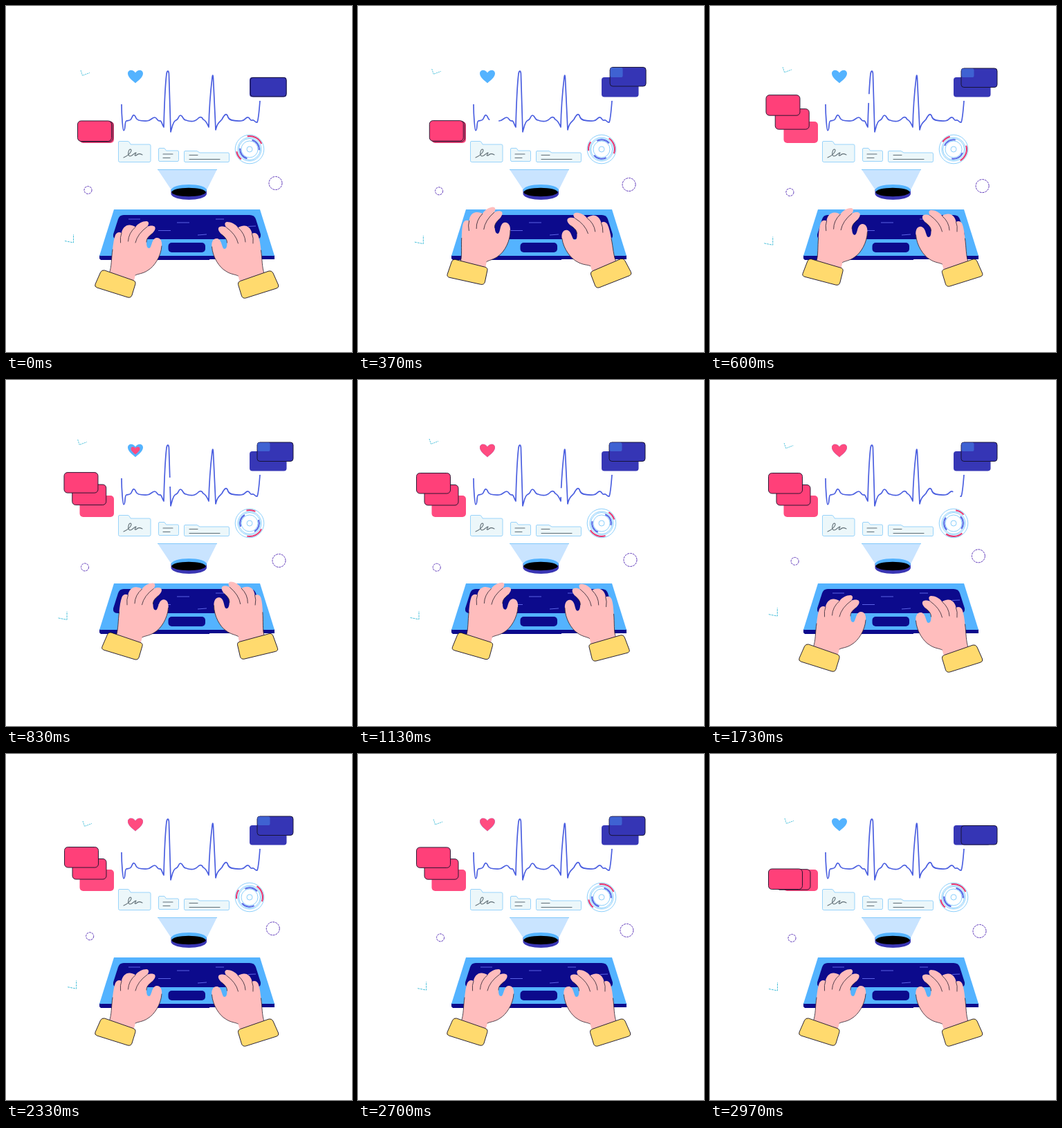
Write an HTML page that moves like this. It is 500 px wide and 500 px high and loops after 3.01 s.

```html
<!DOCTYPE html>
<html lang="en">
<head>
<meta charset="utf-8">
<title>Health desk</title>
<style>
  html, body { margin: 0; width: 100%; height: 100%; overflow: hidden; background: #fff; }
  svg { display: block; width: 100vw; height: 100vh; }
  .line { fill: none; stroke: #2b2230; stroke-width: .8; stroke-linecap: round; }
  .thin { fill: none; stroke: #6fc3fa; stroke-width: .8; }
  .mark { fill: none; stroke: #35b9d6; stroke-width: .9; }
  .folder { fill: #ecf7fa; stroke: #8fd0fa; stroke-width: .9; stroke-linejoin: round; }
  .ink { fill: none; stroke: #5f6d74; stroke-width: 1.1; stroke-linecap: round; }
  .dot { fill: none; stroke: #4a1fb0; stroke-width: .9; stroke-dasharray: 3 1; }
  .edge { stroke: #15102a; stroke-width: .9; }
</style>
</head>
<body>
<svg viewBox="0 0 500 500">
  <defs>
    <path id="heart" d="M0 9.5C-4 6-11 1-11-4.5C-11-10.5-3-11 0-5.5C3-11 11-10.5 11-4.5C11 1 4 6 0 9.5Z"/>
    <g id="hand">
      <path fill="#ffbdbd" d="M149 389C153 376 152 365 154 352C155 343 156 336 158 331C160 326.500 164 326 167 328C168 321 173 316 179 316.500C183 317 186 318 187 319.500C191 314 197 311 203 311C207 311.500 207 315 204 319C208 317 213 317 215 319C217 322 214 326 211 329C206 333 203 336 203 341C203 347 204 350 207 350C211 349 210 337 217 335C223 334 226 340 225 347C224 362 214 377 205 382C198 387 190 387 187 389L184 400Z"/>
      <path class="line" d="M167 328Q164.500 334 165.500 342M187 319.500Q177 328 176.500 340M204 319Q190 329 187 342M211 329C206 333 203 336 203 341M225 347C224 362 214 377 205 382C198 387 190 387 187 389M154 352C152 365 153 376 149 387"/>
      <path fill="#ffda6e" class="edge" stroke-width=".7" stroke-linejoin="round" d="M142.500 382L184 396.500Q188 398 187 401.500L182 418Q180.500 422 176 421L131.500 407Q127.500 405.500 129 402L136.500 385Q138.500 381 142.500 382Z"/>
    </g>
  </defs>

  <path id="tick" class="mark" stroke-dasharray="2 1" d="M108 93L110.500 100.500L121 96.500"/>
  <path id="corner" class="mark" stroke-dasharray="3 1" d="M85 339.500L97.500 342V330"/>
  <circle id="ringA" class="dot" cx="118.500" cy="266" r="5.500"/>
  <circle id="ringB" class="dot" cx="389.500" cy="256" r="9.500"/>

  <use href="#heart" x="187" y="102" fill="#54b3ff"/>
  <use id="pink" href="#heart" fill="#ff4b80"/>

  <path id="pulse" fill="none" stroke="#4b5fe0" stroke-width="1.700" stroke-linejoin="round" pathLength="100"
    d="M167 142C167 160 169 180 170 180C173 180 171 167 174 166C178 165 180 166 182 161C184 156 186 157 188 162C190 167 200 166 204 166C209 166 211 161 215 161C218 161 219 167 222 166C225 165 225 171 228 175C228.500 155 230 115 232 98C233 92 235.500 93 235.500 100L238 182C240 176 241 167 245 165.500C250 164 249 158 252 158C256 158 255 165 260 165C268 168 274 166 277 163C280 159.500 283 160 285 164C288 165 290 168 293 175C293.500 150 296 120 298 103Q299 97 299.500 104L303 179C305 170 308 168 312 164C316 156 319 154 321 161C324 167 334 166 340 166C346 166 346 160 350 161C354 163 352 166 356 165C359 164 360 169 363 168C364.500 165 366 150 367 137"/>

  <rect x="352" y="103" width="53.500" height="28.500" rx="4" fill="#3737b6"/>
  <rect id="blue" class="edge" width="52" height="27.500" rx="4" fill="#3535b5"/>
  <rect id="shine" width="18" rx="2" fill="#3f62d2"/>

  <rect x="106.500" y="167" width="49.500" height="31" rx="5" fill="#ff4b80"/>
  <rect id="redB" class="edge" width="49" height="29.500" rx="5" fill="#ff4079"/>
  <rect id="redA" class="edge" width="49" height="29.500" rx="5" fill="#ff4079"/>

  <path class="folder" d="M162.500 197Q162.500 195.500 164 195.500H176Q178 195.500 179 198L180 200H207Q209 200 209 202V223.500Q209 225.500 207 225.500H164.500Q162.500 225.500 162.500 223.500Z"/>
  <path class="ink" d="M170 219C176 217 184 209 180 207C177 207 175 216 179 217C183 217 186 211 188 212C188 213 184 217 188 216C191 213 193 213 197 215"/>
  <path class="folder" d="M220.500 207Q220.500 205.500 222 205.500H229L231.500 209H248Q249.500 209 249.500 211V222.500Q249.500 224.500 248 224.500H222Q220.500 224.500 220.500 222.500Z"/>
  <path class="ink" d="M227 214H241M227 219.500H237"/>
  <path class="folder" d="M257.500 211Q257.500 209.500 259 209.500H276L280 212H321Q322.500 212 322.500 214V223.500Q322.500 225.500 321 225.500H259Q257.500 225.500 257.500 223.500Z"/>
  <path class="ink" d="M265 215.500H277M265 221.500H309"/>

  <g transform="translate(352 207)" fill="none">
    <circle class="thin" r="20.800"/>
    <circle class="thin" r="17"/>
    <circle class="thin" r="15.500"/>
    <circle class="thin" r="12"/>
    <circle class="thin" r="4"/>
    <circle id="arcP" r="19" stroke="#e8336d" stroke-width="2" pathLength="360" stroke-dasharray="75 155 40 90"/>
    <circle id="arcB" r="13.800" stroke="#5a68e6" stroke-width="2" pathLength="360" stroke-dasharray="80 100"/>
  </g>

  <path fill="#c9e4ff" d="M219 236H305L290 266H239Z"/>
  <path class="thin" d="M219 236.500H305"/>
  <path fill="#3a36b4" d="M238.500 265H290V272C287 282.500 242 282.500 238.500 272Z"/>
  <ellipse cx="264.300" cy="266" rx="25.700" ry="8" fill="#54b3ff"/>
  <ellipse cx="264" cy="269" rx="24.700" ry="6.200"/>

  <path fill="#0c0a8c" d="M135 360H388V366H294V367H137L135 365Z"/>
  <path fill="#54b3ff" d="M156 294H367L388 361H135Z"/>
  <path fill="#0c0a8c" d="M170 302H352Q359 302 361 308L368 330Q369 337 362 337H161Q154 337 155 330L162 308Q164 302 170 302Z"/>
  <rect x="234.500" y="342" width="53.500" height="14" rx="5" fill="#0c0a8c"/>
  <path stroke="#5b62e6" stroke-width="1.200" d="M177 308H194M247 313H265M303 308H315M220 324.500H238M277 331L290 330M350 318.500L361 318"/>

  <use id="left" href="#hand"/>
  <g id="right"><use href="#hand" transform="translate(522.500 1) scale(-1 1)"/></g>
</svg>
<script>
const LOOP = 3010;
const $ = id => document.getElementById(id);
const clamp = x => Math.min(1, Math.max(0, x));
const ease = x => (1 - Math.cos(Math.PI * clamp(x))) / 2;
const soft = x => (ease(x) + clamp(x)) / 2;
const mix = (a, b, k) => a + (b - a) * k;

// Springy arrival that overshoots by about a fifth.
function back(x) {
  const u = clamp(x) - 1;
  return 1 + 3.6 * u ** 3 + 2.6 * u * u;
}

// Eased value between the keys of a track.
function track(t, times, values) {
  let i = 0;
  while (i < times.length - 2 && t > times[i + 1]) i++;
  return mix(values[i], values[i + 1], ease((t - times[i]) / (times[i + 1] - times[i])));
}

const put = (id, value) => $(id).setAttribute('transform', value);
const move = (id, x, y) => put(id, `translate(${x} ${y})`);
const drift = (t, a, b, low, high) => track(t, [0, a, b, 2970], [0, low, high, 0]);

function hand(id, t, cx, cy, xs, ys, turns) {
  const [x, y, r] = [xs, ys, turns].map(v => track(t, [0, 370, 830, 1130, 1600], v));
  put(id, `translate(${x} ${y}) rotate(${r} ${cx} ${cy})`);
}

function draw(t) {
  hand('left', t, 158, 401, [0, 0, 10, 7.5, 0], [0, -17, -17, -17, 0], [0, -5, -.5, -1.5, 0]);
  hand('right', t, 365, 402.5, [0, 1, -1, -1.5, 0], [0, -16.5, -17.5, -15, 0], [0, -4, 4, 3, 0]);

  const a = drift(t, 1050, 1830, -5, 4.5), b = drift(t, 830, 2200, 5, -4);
  move('ringA', a, -a);
  move('ringB', b, b);
  move('tick', drift(t, 1100, 2330, -5, 3), drift(t, 1100, 2330, -8, 4));
  move('corner', drift(t, 980, 2200, -10, 4.5), drift(t, 900, 2200, 4.5, -3));

  // Cards spread out, then fall back vertically before the loop cuts.
  const stay = 1 - ease((t - 2680) / 290);
  const blue = back(t / 500), red = back((t - 370) / 520);
  const bx = mix(353, 363, blue), by = mix(103.5, 90, blue * stay);
  move('blue', bx, by);
  move('shine', bx + .5, by + .5);
  $('shine').setAttribute('height', Math.max(0, 102.5 - by));
  move('redA', mix(103.5, 84.5, red), mix(166, 134.5, red * stay));
  move('redB', mix(105.5, 96, red), mix(166.7, 151.5, red * stay));

  const size = ease((t - 550) / 500) * stay;
  put('pink', `translate(187 102) scale(${size})`);

  // A short gap runs along the pulse line.
  const gap = mix(-1.2, 101.2, soft(t / 1950));
  $('pulse').style.strokeDasharray = '101 2';
  $('pulse').style.strokeDashoffset = 102 - gap;

  const spin = 195 * soft(t < 1350 ? t / 1350 : (2700 - t) / 1350);
  put('arcP', `rotate(${spin - 100})`);
  put('arcB', `rotate(${-spin - 75})`);
}

function tick(now) {
  draw(now % LOOP);
  requestAnimationFrame(tick);
}
draw(0);
requestAnimationFrame(tick);
</script>
</body>
</html>
```
